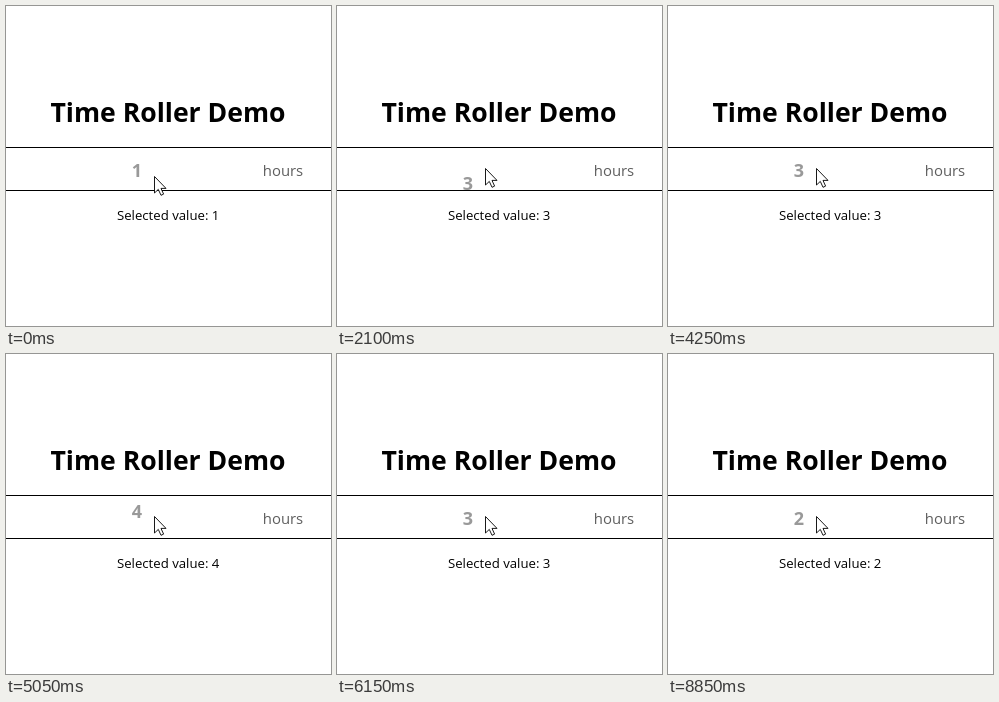
Write an HTML page that moves like this. It is 325 by 320 pixels and loops after 9.05 s.

```html
<!DOCTYPE html>
<html lang="en">
<head>
<meta charset="utf-8">
<title>Time Roller Demo</title>
<style>
  html, body { margin: 0; width: 100%; height: 100%; overflow: hidden; background: #fff; }
  svg { display: block; width: 325px; height: 320px; font-family: "Open Sans", "Noto Sans", sans-serif; }
  text { text-anchor: middle; }
  .title { font-size: 26.6px; font-weight: 700; }
  .digit { font-size: 18px; font-weight: 700; fill: #999; }
  .unit { font-size: 14.9px; fill: #5e5e5e; }
  .label { font-size: 13.2px; }
</style>
</head>
<body>
<svg viewBox="0 0 325 320">
  <clipPath id="band"><rect y="142" width="325" height="42"/></clipPath>
  <text class="title" x="162" y="116">Time Roller Demo</text>
  <g clip-path="url(#band)"><g id="strip"></g></g>
  <text class="unit" x="277" y="170">hours</text>
  <path d="M0 141.5H325M0 184.5H325" stroke="#000"/>
  <text class="label" x="162.2" y="214" id="label"></text>
  <path id="cursor" d="M.5 .5V17L4.3 13.4 7 19.3 9.6 18.1 7 12.4H12Z" fill="#fff" stroke="#000" stroke-width=".9"/>
</svg>
<script>
const LOOP = 9050, STEP = 50, PITCH = 43;
// [start time, change of value]
const rolls = [[800, 1], [2000, 1], [2950, 1], [3900, -1], [4850, 1],
               [5750, -1], [6600, -1], [7600, 1], [8350, -1]];
const $ = id => document.getElementById(id);

$("strip").innerHTML = [1, 2, 3, 4, 5].map(n =>
  `<text class="digit" x="131" y="${171 + (n - 1) * PITCH}">${n}</text>`).join("");

// Underdamped spring from 0 to 1
function spring(t) {
  if (t <= 0) return 0;
  if (t >= 400) return 1;
  const a = 0.0082, w = 0.0145;
  return 1 - Math.exp(-a * t) * (Math.cos(w * t) + a / w * Math.sin(w * t));
}

function ease(t, start, end) {
  const p = Math.min(1, Math.max(0, (t - start) / (end - start)));
  return p * p * (3 - 2 * p);
}

function draw(t) {
  let pos = 1, value = 1;
  for (const [start, change] of rolls) {
    const p = spring(t - start);
    pos += change * p;
    if (p > 0.5) value += change;
  }
  const cursorY = 170 - 16 * ease(t, 0, 650) + 8 * ease(t, 1350, 1700);
  $("strip").setAttribute("transform", `translate(0 ${(1 - pos) * PITCH})`);
  $("cursor").setAttribute("transform", `translate(148 ${Math.round(cursorY)})`);
  $("label").textContent = "Selected value: " + value;
}

const begin = performance.now();
function frame() {
  const t = (performance.now() - begin) % LOOP;
  draw(Math.floor(t / STEP) * STEP);
  requestAnimationFrame(frame);
}
frame();
</script>
</body>
</html>
```
